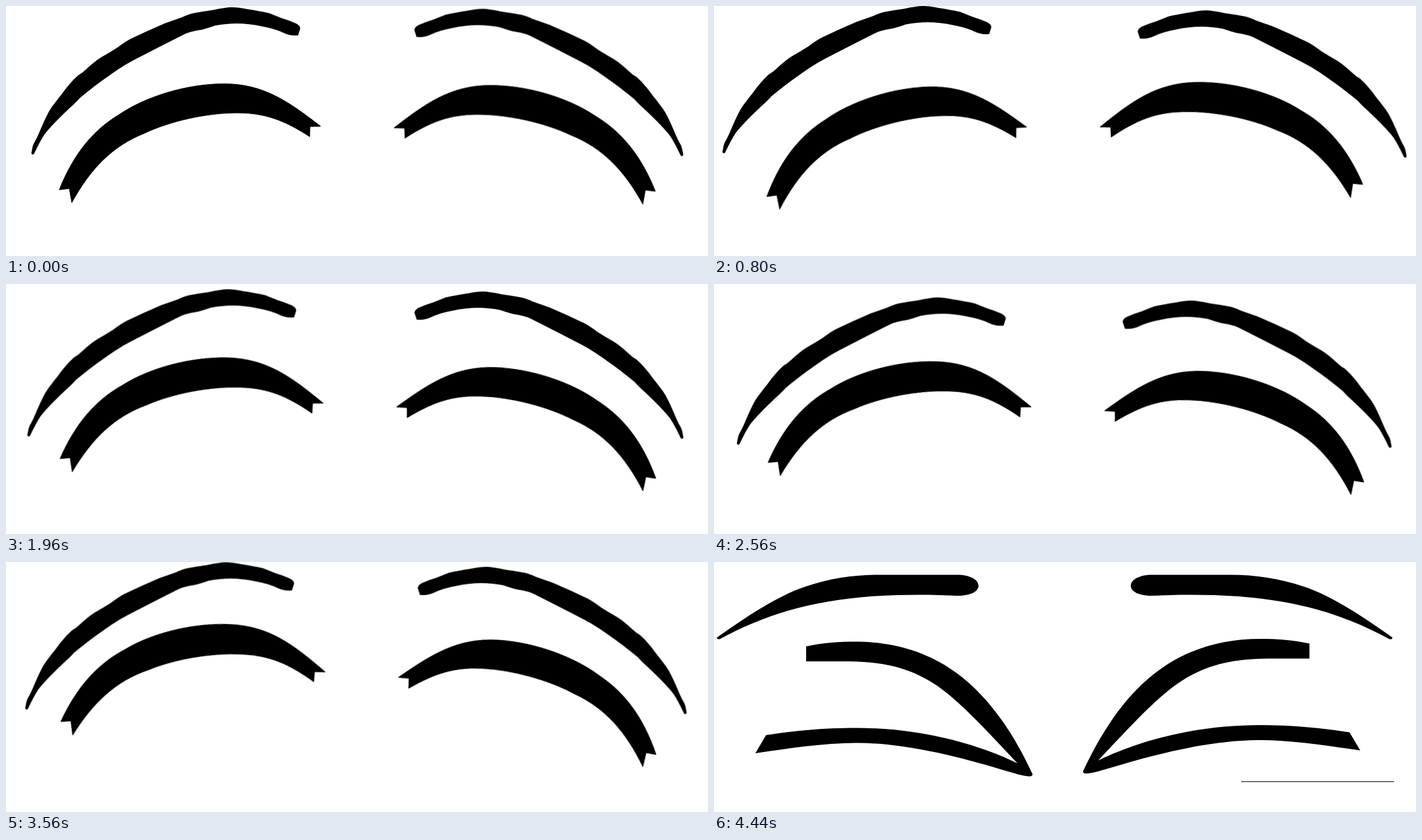
An HTML page without scripts for the animation above (4.64 s loop, 1120x400 px).

```html
<!DOCTYPE html>
<html lang="en">
<head>
<meta charset="utf-8">
<title>Eyes</title>
<style>
  html, body { margin: 0; width: 100%; height: 100%; overflow: hidden; background: #fff; }
  svg { display: block; width: 100%; height: 100%; }
  .lids, .brow-l, .brow-r, .open, .shut { animation: 4640ms linear infinite; }
  .lids { animation-name: lids; transform-origin: 560px 329px; }
  .brow-l { animation-name: brow-l; }
  .brow-r { animation-name: brow-r; }
  .open { animation-name: open; animation-timing-function: step-end; }
  .shut { animation-name: shut; animation-timing-function: step-end; visibility: hidden; }

  @keyframes open { 0% { visibility: visible } 95.68%, 100% { visibility: hidden } }
  @keyframes shut { 0% { visibility: hidden } 95.68%, 100% { visibility: visible } }

  /* both lids tilt as one around a point below them */
  @keyframes lids {
    0% { transform: translateY(0) rotate(0deg) }
    12.07% { transform: translateY(0) rotate(-1.05deg) }
    17.24% { transform: translateY(0) rotate(-1.32deg) }
    21.55% { transform: translateY(0) rotate(-1.43deg) }
    24.14% { transform: translateY(0) rotate(-.9deg) }
    29.31% { transform: translateY(0) rotate(.47deg) }
    36.21%, 48.28% { transform: translateY(0) rotate(1.75deg) }
    51.72% { transform: translateY(1.5px) rotate(1.75deg) }
    55.17% { transform: translateY(6px) rotate(1.74deg) }
    61.21% { transform: translateY(14px) rotate(1.7deg) }
    68.97% { transform: translateY(-14px) rotate(1.55deg) }
    72.41% { transform: translateY(-17px) rotate(1.6deg) }
    74.14% { transform: translateY(-16px) rotate(2deg) }
    84.48% { transform: translateY(-6.5px) rotate(6.05deg) }
    85.34% { transform: translateY(-6px) rotate(6.38deg) }
    87.93% { transform: translateY(-5.5px) rotate(6.9deg) }
    94.83%, 100% { transform: translateY(-5px) rotate(7.1deg) }
  }
  @keyframes brow-l {
    0% { transform: translate(0, 0) }
    12.07% { transform: translate(-18px, -1.3px) }
    17.24% { transform: translate(-27px, -2px) }
    21.55%, 22.41% { transform: translate(-33px, -2.4px) }
    24.14% { transform: translate(-31px, -2.2px) }
    29.31% { transform: translate(-18.5px, -1.5px) }
    36.21% { transform: translate(-8px, .3px) }
    48.28% { transform: translate(-5px, 12.5px) }
    55.17% { transform: translate(-4px, 19.5px) }
    60.34% { transform: translate(-4px, 23px) }
    68.97% { transform: translate(-11.5px, 6.5px) }
    72.41% { transform: translate(-14px, -2px) }
    74.14% { transform: translate(-13px, -2.3px) }
    85.34% { transform: translate(.5px, 1px) }
    94.83%, 100% { transform: translate(4px, 1px) }
  }
  @keyframes brow-r {
    0% { transform: translate(0, 0) }
    12.07% { transform: translate(16.5px, 1.7px) }
    17.24% { transform: translate(24.5px, 2.5px) }
    21.55% { transform: translate(27.8px, 2.7px) }
    24.14% { transform: translate(26.5px, 2.5px) }
    29.31% { transform: translate(10px, 1.5px) }
    36.21% { transform: translate(0, .5px) }
    48.28% { transform: translate(.5px, 14.5px) }
    55.17% { transform: translate(.5px, 22px) }
    60.34% { transform: translate(1px, 25px) }
    68.97% { transform: translate(1px, 10.5px) }
    72.41% { transform: translate(2px, 4px) }
    83.62% { transform: translate(11px, 2px) }
    85.34% { transform: translate(9.5px, 2px) }
    94.83%, 100% { transform: translate(2px, 1px) }
  }
</style>
</head>
<body>
<svg viewBox="0 0 1120 400">
  <defs>
    <path id="brow" d="M40.5 235C42 229 42 223 46 217C52 207 58 188 69 168C75 158 82 150 89 141C97 130 104 121 115 111Q122 107 127 102Q142 88 152 82Q166 74 177 67Q190 57 199 52.5Q227 39 254 27.5L281 18Q291 13 299 11.5Q315 8.5 330 6.5Q350 2 360 2Q371 2 385 5Q405 8 420 11.5L440 19.5Q452 23 463 28Q469 31 469.5 36L466 47Q452 48 443 43Q428 36 408 32.5Q388 28 368 28Q350 28 333 31.5Q316 37.5 309 38.5Q294 41 286 44.5Q255 60 203 87C180 99 146 124 118 147Q113 153 104 161Q73 190 61 206Q54 217 45 236Q43 239.5 40.5 236Z"/>
    <path id="lid" stroke="#000" stroke-linejoin="round" d="M85 294C108 236 140 198 180 174C224 144 290 124.5 348 124.5C410 124.5 450 152 502 192.5L485 193L484.5 209C443 182 412 171 369 171C320 171 262 184 220 204C170 224 135 260 105 314.5L101 292Z"/>
    <path id="flat-brow" d="M4.5 121C70 74 113 50 147 39C185 26 225 20.5 262 20.5L388 20.5C408 20.5 422 28 422 38C422 47 410 54 388 54C350 52 300 51.5 250 55C150 63 80 85 9 123.5Q5 124 4.5 121Z"/>
    <path id="squint" d="M147 135C175 129 200 127.5 225 127.5C365 127.5 448 210 508 339Q509 343 503 343C490 342 480 338 465 334C380 308 300 290 230 289.5C180 289 120 298 66 306L83 277C130 270 170 265.5 228 265.5C330 265.5 420 291 484 322C440 275 405 237 372 210C320 168 270 160 215 159L147 159Z"/>
  </defs>
  <g class="open">
    <g class="brow-l"><use href="#brow"/></g>
    <g class="brow-r"><use href="#brow" transform="matrix(-1 0 0 1 1121 2.5)"/></g>
    <g class="lids">
      <use href="#lid"/>
      <use href="#lid" transform="matrix(-1 0 0 1 1121 2.5)"/>
    </g>
  </g>
  <g class="shut">
    <use href="#flat-brow"/>
    <use href="#flat-brow" transform="matrix(-1 0 0 1 1087 0)"/>
    <use href="#squint"/>
    <use href="#squint" transform="matrix(-1 0 0 1 1097 -4.5)"/>
    <rect x="841" y="351" width="244" height="1"/>
  </g>
</svg>
</body>
</html>
```
